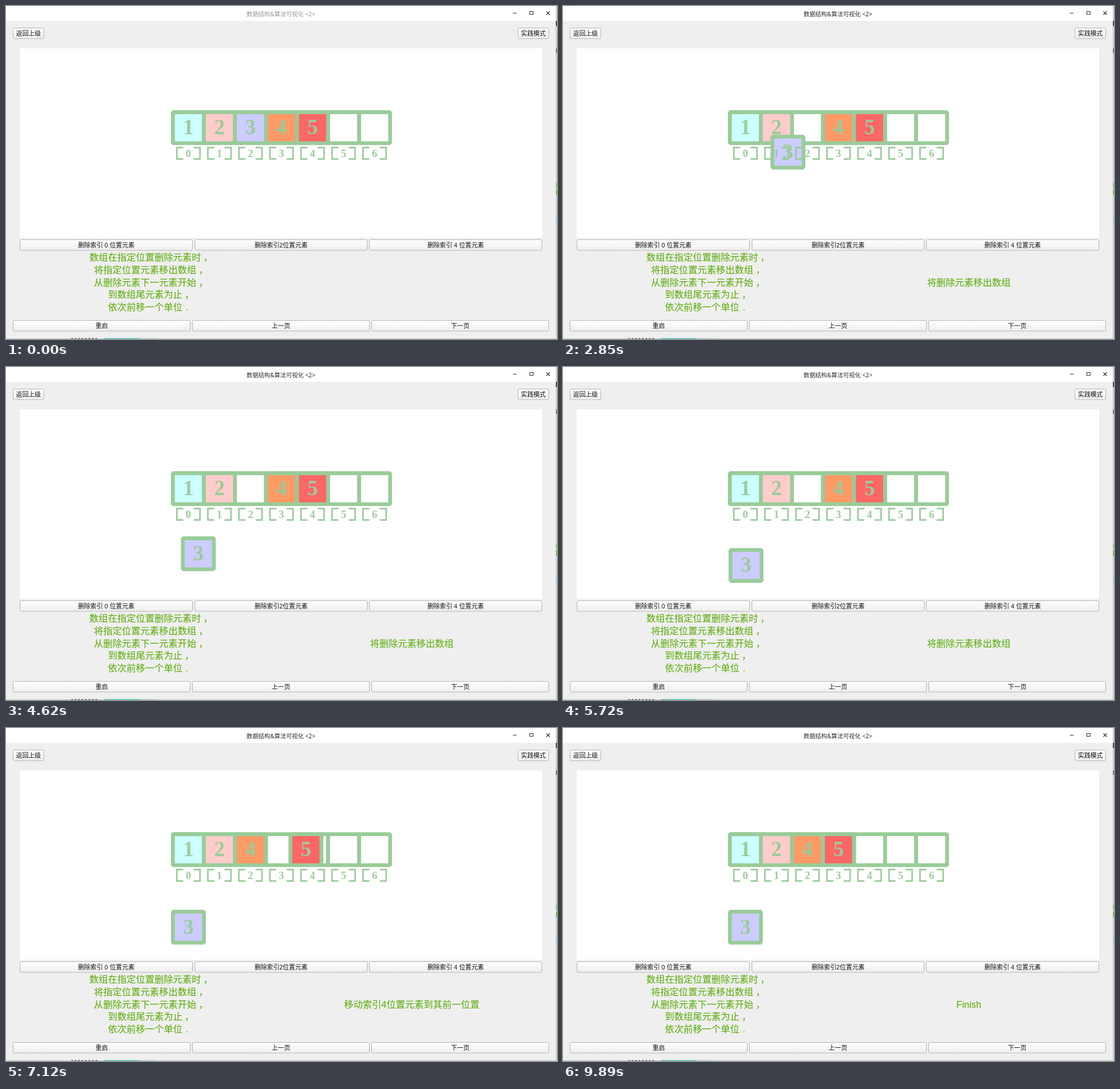
These frames come from a looping animation (962x582 px, 9.96 s). An HTML page with a canvas:

```html
<!DOCTYPE html>
<html lang="zh-CN">
<head>
<meta charset="utf-8">
<style>
html, body { margin: 0; width: 100%; height: 100%; overflow: hidden; background: #efefef; }
canvas { display: block; }
</style>
</head>
<body>
<canvas id="stage" width="962" height="582"></canvas>
<script>
const ctx = document.getElementById('stage').getContext('2d');
const LOOP = 9960, CELL = 54.17, LEFT = 291.4, TOP = 185.6, LINE = 6.6;
const GREEN = '#99cc99', LABEL = '#55aa00';
const SANS = '"Liberation Sans", "Noto Sans CJK SC", sans-serif';
const TITLE = '"Noto Sans", "Noto Sans CJK SC", sans-serif';
const SERIF = '"Liberation Serif", serif';
const COLORS = ['#ccffff', '#ffcccc', '#ccccff', '#ff9966', '#ff6666'];

// Timeline of the removal: [time, progress]
const REMOVAL = [[850, 0], [1280, .032], [1430, .05], [1890, .115], [2850, .315],
  [3880, .63], [4620, .84], [5130, .926], [5720, .99], [5830, 1]];
const HOLDS = [[990, 1280], [1430, 1890], [4620, 4880], [5130, 5480]];
const SHIFT_4 = 5800, SHIFT_5 = 6800, DONE = 7850;

function removal(t) {
  for (const [from, to] of HOLDS) if (t >= from && t < to) t = from;
  const i = REMOVAL.findIndex(key => key[0] >= t);
  if (i === 0) return 0;
  if (i < 0) return 1;
  const [t0, p0] = REMOVAL[i - 1], [t1, p1] = REMOVAL[i];
  return p0 + (p1 - p0) * (t - t0) / (t1 - t0);
}

function ease(t, from, to) {
  const u = Math.min(1, Math.max(0, (t - from) / (to - from)));
  return (1 - Math.cos(Math.PI * u)) / 2;
}

function rect(x, y, w, h, color) {
  ctx.fillStyle = color;
  ctx.fillRect(x, y, w, h);
}

function text(str, x, y, size, color, family = SANS, align = 'center') {
  ctx.font = size + 'px ' + family;
  ctx.textAlign = align;
  ctx.fillStyle = color;
  ctx.fillText(str, x, y);
}

function bold(str, x, y, size) {
  ctx.font = `bold ${size}px ${SERIF}`;
  ctx.textAlign = 'center';
  ctx.fillStyle = GREEN;
  ctx.fillText(str, x, y);
}

function polyline(points, color, width) {
  ctx.strokeStyle = color;
  ctx.lineWidth = width;
  ctx.beginPath();
  points.forEach(p => ctx.lineTo(...p));
  ctx.stroke();
}

function button(label, x, y, w) {
  const shade = ctx.createLinearGradient(0, y, 0, y + 18);
  shade.addColorStop(0, '#ffffff');
  shade.addColorStop(1, '#efefef');
  ctx.fillStyle = shade;
  ctx.strokeStyle = '#b4b4b4';
  ctx.lineWidth = 1;
  ctx.beginPath();
  ctx.roundRect(x, y, w, 18.5, 2);
  ctx.fill();
  ctx.stroke();
  text(label, x + w / 2, y + 13.2, 10.84, '#111');
}

function drawWindow(active) {
  rect(0, 0, 962, 582, '#efefef');
  rect(0, 0, 960, 26, '#fff');
  rect(24, 74, 912, 331, '#fff');
  text('数据结构＆算法可视化 <2>'.replace('＆', '&'), 480, 17.8, 10.25, active ? '#2e2e2e' : '#999', TITLE);

  polyline([[885, 12.5], [891.5, 12.5]], '#333', 1);
  ctx.strokeRect(914.5, 9.5, 6, 5);
  polyline([[943.5, 9.5], [949.5, 15.5]], '#333', 1.2);
  polyline([[949.5, 9.5], [943.5, 15.5]], '#333', 1.2);

  button('返回上级', 12.5, 38.5, 53.5);
  button('实践模式', 894, 38.5, 53.5);
  button('删除索引 0 位置元素', 24.5, 408.5, 301);
  button('删除索引2位置元素', 330, 408.5, 300.5);
  button('删除索引 4 位置元素', 634.5, 408.5, 301);
  button('重启', 12.5, 549.5, 309);
  button('上一页', 325.5, 549.5, 309);
  button('下一页', 638.5, 549.5, 309);

  // Slivers of the desktop along the window edge
  rect(960, 0, 1, 582, '#b8b8b8');
  rect(961, 0, 1, 582, '#e9e9e9');
  rect(960, 26, 2, 9, '#444');
  rect(960, 74, 2, 8, '#777');
  rect(960, 309, 2, 8, '#8fc765');
  rect(960, 321, 2, 9, '#74b94a');
  rect(960, 367, 2, 10, '#9fd5cf');
  rect(0, 581, 960, 1, '#c2c2c2');
  for (let x = 114; x < 160; x += 6) rect(x, 580.5, 3, 1.5, '#555');
  rect(171, 580.5, 62, 1.5, '#4dbdae');
  rect(233, 580.5, 31, 1.5, '#b4c8c4');
}

function drawNotes() {
  const size = 16.26;
  const notes = [
    ['数组在指定位置删除元素时', 145.5], ['将指定位置元素移出数组', 153.6],
    ['从删除元素下一元素开始', 153.6], ['到数组尾元素为止', 178], ['依次前移一个单位', 178]
  ];
  notes.forEach(([line, x], i) => {
    const y = 445.2 + i * 21.65, end = x + line.length * size;
    text(line, x, y, size, LABEL, SANS, 'left');
    if (i < 4) text('，', end + 4, y, size, LABEL, SANS, 'left');
    else text('.', end + 8, y, size, LABEL);
  });
}

function drawArray(t) {
  ctx.lineJoin = 'bevel';
  ctx.strokeStyle = GREEN;
  ctx.lineWidth = LINE;
  for (let i = 0; i < 7; i++) ctx.strokeRect(LEFT + i * CELL, TOP, CELL, CELL);

  const out = removal(t);
  const offsets = [[0, 0], [0, 0], [-2 * out, 2.5 * out],
    [-ease(t, SHIFT_4, SHIFT_5), 0], [-ease(t, SHIFT_5, DONE), 0]];
  offsets.forEach(([dx, dy], i) => {
    const x = LEFT + (i + dx) * CELL, y = TOP + dy * CELL;
    rect(x, y, CELL, CELL, COLORS[i]);
    ctx.strokeStyle = GREEN;
    ctx.lineWidth = LINE;
    ctx.strokeRect(x, y, CELL, CELL);
    bold(i + 1, x + CELL / 2, y + 38.6, 37);
  });

  ctx.lineJoin = 'miter';
  for (let i = 0; i < 7; i++) {
    const cx = LEFT + (i + .5) * CELL;
    for (const side of [-1, 1]) {
      const near = cx + side * 9, far = cx + side * 20.2;
      polyline([[near, 247.3], [far, 247.3], [far, 267.3], [near, 267.3]], GREEN, 2.7);
    }
    bold(i, cx, 264.2, 18.5);
  }
}

function status(t) {
  if (t < 850) return '';
  if (t < SHIFT_4) return '将删除元素移出数组';
  if (t < SHIFT_5) return '移动索引3位置元素到其前一位置';
  if (t < DONE) return '移动索引4位置元素到其前一位置';
  return 'Finish';
}

function frame() {
  const t = performance.now() % LOOP;
  drawWindow(t >= 580);
  drawNotes();
  text(status(t), 708.5, 488.5, 16.26, LABEL);
  drawArray(t);
  requestAnimationFrame(frame);
}
frame();
</script>
</body>
</html>
```
